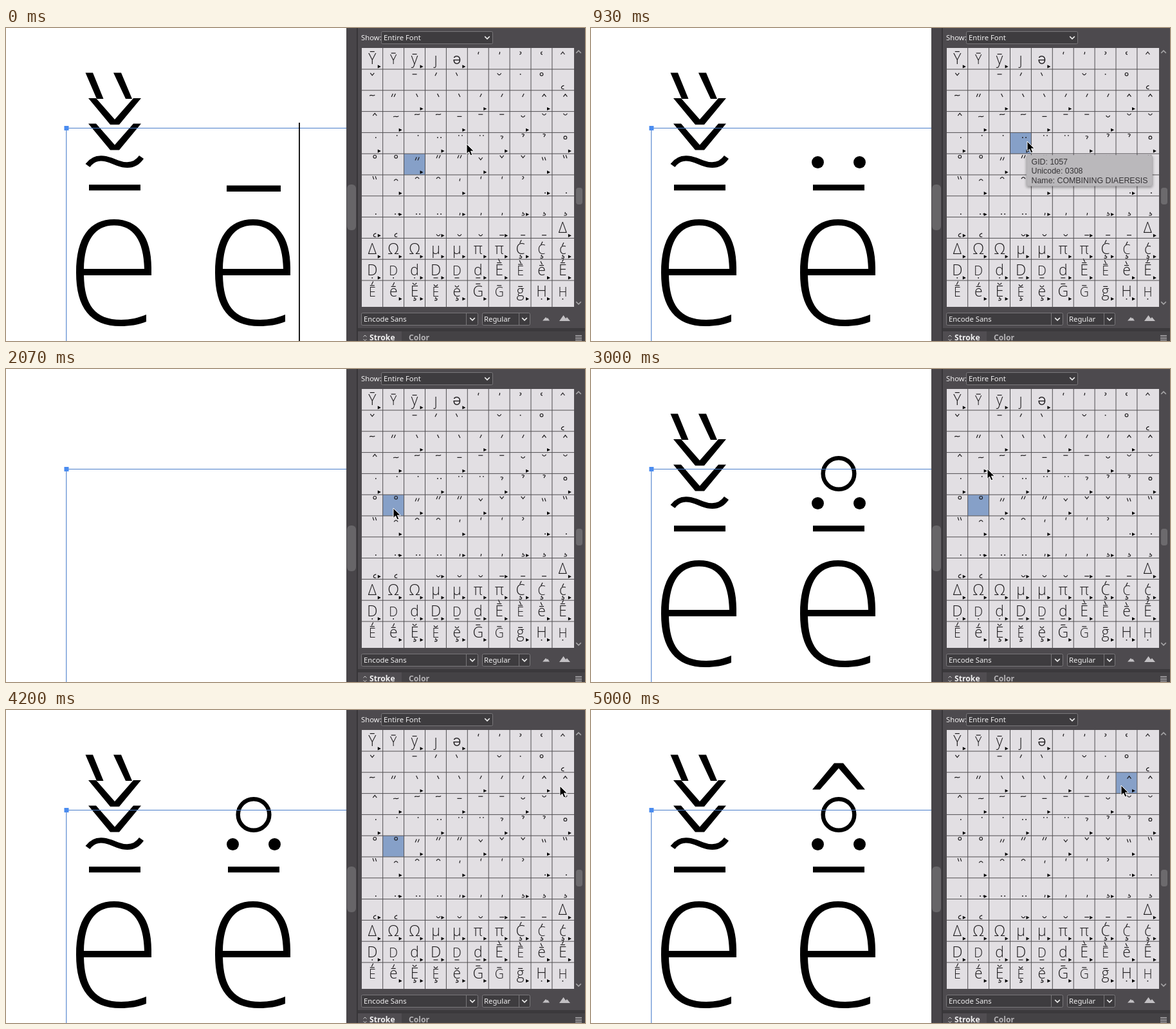
These frames come from a looping animation (900 by 486 pixels, 5070 ms). An HTML page:

```html
<!DOCTYPE html>
<html lang="en">
<head>
<meta charset="utf-8">
<title>Stacking diacritics</title>
<style>
  html, body { margin: 0; width: 100%; height: 100%; overflow: hidden; background: #fff; }
  svg { display: block; width: 900px; height: 486px; }
  .ui { font: 11.3px "Noto Sans", "Open Sans", sans-serif; fill: #f1f0f1; }
  .tab { font-size: 12.2px; font-weight: 700; }
  .glyph { font-family: "Open Sans", Inter, Roboto, "Noto Sans", sans-serif; font-weight: 300; text-anchor: middle; fill: #1c1a1c; }
  .tip text { font: 12.4px "Liberation Sans", Arial, sans-serif; fill: #363437; }
  .field { fill: #3e3c3f; stroke: #79777a; }
  .chev { fill: none; stroke: #eee; stroke-width: 1.5; }
  .mark { fill: none; stroke: #1c1a1c; stroke-width: 1.2; }
  .dot { stroke-width: 1.7; }
</style>
</head>
<body>
<svg viewBox="0 0 900 486">
  <defs>
    <path id="e" fill-rule="evenodd" d="M226 384H121C122 430 138 453 179 453C193 453 206 450 218 445V456C205 461 192 463 178 463C131 463 109 434 109 380C109 325 130 297 168 297C206 297 226 325 226 372ZM121 374H215C214 330 198 306.5 168 306.5C138 306.5 122 330 121 374Z"/>
    <path id="caron" d="M128 109H140L169 142L198 109H210L176 150H162Z"/>
    <path id="bar" d="M129 243.2H209V252.2H129Z"/>
    <path id="chev" class="chev" d="M-3.8-1.9L0 1.9L3.8-1.9"/>
    <filter id="shade" x="-10%" y="-20%" width="120%" height="150%">
      <feDropShadow dx="0" dy="2" stdDeviation="2" flood-opacity=".4"/>
    </filter>
  </defs>

  <rect width="900" height="486" fill="#fff"/>
  <g id="words">
    <use href="#e"/>
    <use href="#bar"/>
    <path d="M127 213.5C136 201 148 200 163 205.5L173 209.5C189 215.5 202 213 210.5 200.5" fill="none" stroke="#000" stroke-width="8.5"/>
    <use href="#caron"/>
    <use href="#caron" y="39.5"/>
    <path d="M123.500 69.500H135L151.500 110H141ZM167 69.500H179L196 110H186Z"/>
    <use href="#e" x="216"/>
    <path id="wideBar" d="M343 244.5H427V254H343Z"/>
    <g id="diaeresis">
      <use href="#bar" x="216"/>
      <circle cx="352.5" cy="208.5" r="9.5"/>
      <circle cx="417.5" cy="208.5" r="9.5"/>
    </g>
    <circle id="ring" cx="385" cy="162.5" r="24.3" fill="none" stroke="#000" stroke-width="6.5"/>
    <path id="hat" d="M344 123.5L378 82.5H392L426 123.5H414L385 90.5L356 123.5Z"/>
  </g>
  <path d="M93.800 486V155.500H529" fill="none" stroke="#4a7ecb" stroke-width="1.1"/>
  <rect x="90.5" y="152" width="7" height="7" fill="#4a8cf0"/>
  <path id="caret" d="M456 147V486" stroke="#000" stroke-width="1.8"/>

  <rect x="529" width="371" height="486" fill="#4d4a4e"/>
  <rect x="529" width="16" height="486" fill="#484549"/>
  <rect x="545" width="2" height="486" fill="#373538"/>
  <rect x="530" y="243" width="14" height="71" rx="6" fill="#676568"/>
  <rect x="553" y="31" width="330" height="402" fill="#e2dfe3"/>
  <rect id="pick" width="32.5" height="32.5" fill="#86a0c8"/>
  <g id="grid"></g>
  <rect x="886" y="248" width="10" height="26" rx="4" fill="#6c6a6d"/>
  <use href="#chev" transform="translate(890 37) scale(1 -1)" opacity=".55"/>
  <use href="#chev" x="890" y="427" opacity=".55"/>

  <g class="ui">
    <text x="552" y="19.3">Show:</text>
    <rect class="field" x="583.5" y="5.5" width="173" height="19" rx="2"/>
    <text x="587" y="19.3">Entire Font</text>
    <use href="#chev" x="748" y="15"/>
    <rect class="field" x="552.5" y="442.5" width="181" height="19" rx="2"/>
    <path d="M715.5 443V461" stroke="#79777a"/>
    <text x="556" y="456.3">Encode Sans</text>
    <use href="#chev" x="725" y="452"/>
    <rect class="field" x="740.5" y="442.5" width="74" height="19" rx="2"/>
    <path d="M797.5 443V461" stroke="#79777a"/>
    <text x="743" y="456.3">Regular</text>
    <use href="#chev" x="806" y="452"/>
    <path d="M834 454.5L839 449L841 451L842 450L845 454.5ZM860 455L866.5 446L870 451L872 449L877 455Z" fill="#c2c0c3"/>
    <rect x="547" y="466" width="353" height="20" fill="#3b393c"/>
    <rect x="547" y="471" width="353" height="15" fill="#444245"/>
    <rect x="547" y="471" width="68" height="15" fill="#504d51"/>
    <path d="M555.5 479.5L558 477L560.5 479.5M555.5 483L558 485.5L560.5 483" fill="none" stroke="#ccc"/>
    <text class="tab" x="565" y="485.3">Stroke</text>
    <text class="tab" x="626" y="485.3" fill="#b5b3b6">Color</text>
    <path d="M885 477.5H895M885 480H895M885 482.5H895M885 485H895" stroke="#c2c0c3"/>
  </g>

  <g id="tips"></g>
  <path id="mouse" d="M0 0V15.5L3.6 12.2L6 18L8.8 16.8L6.4 11.2H11.3Z" fill="#000" stroke="#fff"/>
</svg>
<script>
const NS = 'http://www.w3.org/2000/svg';
const $ = id => document.getElementById(id);
function add(parent, tag, attrs, text) {
  const el = document.createElementNS(NS, tag);
  for (const k in attrs) el.setAttribute(k, attrs[k]);
  if (text) el.textContent = text;
  return parent.appendChild(el);
}

// Small accent shapes, centred on the origin.
const MARKS = {
  c: 'M-3-2L0 1.8L3-2', h: 'M-3 2L0-1.8L3 2', m: 'M-3.5 0H3.5',
  a: 'M-1 2.5L1.5-2.5', g: 'M-1.5-2.5L1 2.5',
  A: 'M-3 2.5L-.8-2.5M1 2.5L3.2-2.5', G: 'M-3.2-2.5L-1.5 2.5M.8-2.5L2.5 2.5',
  b: 'M-3-1.5Q0 3.5 3-1.5', n: 'M-3 1.5Q0-3.5 3 1.5',
  t: 'M-4 .8C-2-2 1.5 2.2 4-.8', r: 'M-2.3 0A2.3 2.3 0 1 1 2.3 0A2.3 2.3 0 1 1-2.3 0',
  d: 'M-.8 0H.8', D: 'M-3.4 0H-1.8M1.8 0H3.4',
  q: 'M-2-2.3Q2.5-3 1.5-.5L0 1V2.2', o: 'M.8-2V0L0 2', z: 'M1.2-2L.3 0V2',
  k: 'M-1.2-2Q1.5-2 1 0Q.5 2-1.5 2', y: 'M1.5-2Q-1-2-1 0Q-1 2 1.5 2',
  s: 'M0-3L-.5-1Q2.5-1 2 1Q1.5 2.5-2 2', O: 'M2-2.8Q-2-2-2 .5Q-2 2.8 2 2.5'
};
Object.assign(MARKS, { x: MARKS.d, X: MARKS.D, v: MARKS.o, B: MARKS.b, M: MARKS.m });
const LOW = 'xXvBMsO', DOTS = 'dDxX';

// "=" letter or "-" small capital, then its accents; ">" has alternates, "_" empty.
const ROWS = [
  '=Ym> -Ym =ym> =ȷ =ə> z o k y h',
  'c _ m a g _ b d r O',
  't A g> g g a> a a h> h',
  'h t> t t m> m m b> b b',
  'd> d d D> D D q> q q r>',
  'r r A> A A c> c c G> G',
  'G n> n n z> z z k x> x',
  'x X> X X v> v v s> s s',
  'O> O _ B> B B M> M M =Δ>',
  '=Δ> =Ω> =Ω> =μ> =μ> =π> =π> =Cas> -Cas =cas>',
  '=Dx> -Dx =dx> =DM> -DM =dM> =Emg> -Emg =emg> =Ema>',
  '-Ema =ema> =Ebs> -Ebs =ebs> =Gm> -Gm =gm> =Hx> -Hx'
];
const CELL_W = 32.9, CELL_H = 32.8, LEFT = 553, TOP = 31;
const colX = c => LEFT + c * CELL_W, rowY = r => TOP + r * CELL_H;

function drawMark(kind, x, y) {
  add($('grid'), 'path', { class: DOTS.includes(kind) ? 'mark dot' : 'mark', d: MARKS[kind], transform: `translate(${x} ${y})` });
}
function drawLetter([type, base, ...accents], x, y) {
  const size = type === '=' ? 23 : 19.5;
  add($('grid'), 'text', { class: 'glyph', x, y, 'font-size': size }, base);
  let top = y - size * (base === base.toUpperCase() ? .714 : .54) - 3;
  for (const kind of accents) {
    const low = LOW.includes(kind);
    drawMark(kind, x, low ? y + 4 : top);
    if (!low) top -= 3.8;
  }
}
function drawCell(token, r, c) {
  const x = colX(c) + 16.3, y = rowY(r), more = token.endsWith('>');
  const name = token.replace('>', ''), kind = name[0];
  if (name.length > 1) {
    drawLetter(name, x, y + 25);
  } else if (MARKS[kind]) {
    const dx = r < 2 || (r === 2 && c < 2) ? 0 : DOTS.includes(kind) ? 5.5 : 4;
    const dy = LOW.includes(kind) ? 28.3 : r < 3 || more ? 8 : 4.8;
    drawMark(kind, x + dx, y + dy);
  }
  if (more) add($('grid'), 'path', { d: `M${x + 8.5} ${y + 26.3}l5 2.6l-5 2.6z`, fill: '#000' });
}
ROWS.forEach((row, r) => row.split(' ').forEach((token, c) => drawCell(token, r, c)));
let lines = '';
for (let c = 1; c < 10; c++) lines += `M${colX(c) - .2} ${TOP}V433`;
for (let r = 1; r < 12; r++) lines += `M${LEFT} ${rowY(r) + .2}H883`;
add($('grid'), 'path', { d: lines, stroke: '#504e51', fill: 'none' });

function makeTip(x, y, w, rows) {
  const g = add($('tips'), 'g', { class: 'tip' });
  add(g, 'rect', { x, y, width: w, height: rows.length * 14.4 + 4.5, rx: 2, fill: '#bab8bb', stroke: '#a5a3a6', 'stroke-width': .6, filter: 'url(#shade)' });
  rows.forEach((s, i) => add(g, 'text', { x: x + 7.5, y: y + 14.4 + i * 14.3 }, s));
  return g;
}
const tipA = makeTip(677, 197.5, 195.5, ['GID: 1057', 'Unicode: 0308', 'Name: COMBINING DIAERESIS']);
const tipB = makeTip(617, 237.5, 210.5, ['GID: 1157', 'Unicode: 030A', 'Small Capitals From Capitals (c2sc)', 'Name: COMBINING RING ABOVE']);

const LOOP = 5070, FPS = 15;
// time, x, y of the pointer
const PATH = [
  [0, 716, 180], [330, 678, 176], [1060, 678, 176], [1470, 617, 217], [1670, 617, 217], [1800, 602, 216],
  [2500, 602, 216], [3000, 616, 155], [3130, 619, 149], [3600, 646, 142], [4100, 861, 118],
  [4200, 861, 118], [4440, 824, 117]
];
// time, column, row of the selected cell
const PICKS = [[0, 2, 5], [600, 3, 4], [2066, 1, 5], [4466, 8, 2]];
const BLANK = 130;
const BLINKS = [[0, 265], [1060, 1530], [2460, 2930], [3460, 3930], [4400, 4460]];

const within = (t, a, b) => t >= a && t < b;
const show = (el, on) => { el.style.visibility = on ? 'inherit' : 'hidden'; };

function pointer(t) {
  const i = PATH.findIndex(p => p[0] > t);
  if (i < 0) return PATH[PATH.length - 1].slice(1);
  const [t0, x0, y0] = PATH[i - 1], [t1, x1, y1] = PATH[i];
  const u = (t - t0) / (t1 - t0), k = u * u * (3 - 2 * u);
  return [x0 + (x1 - x0) * k, y0 + (y1 - y0) * k];
}

function render(now) {
  const t = Math.floor((now % LOOP) * FPS / 1000 + .1) * 1000 / FPS + .5;
  const stage = PICKS.filter(p => p[0] <= t).length - 1;
  const [since, col, row] = PICKS[stage];
  $('pick').setAttribute('x', colX(col));
  $('pick').setAttribute('y', rowY(row) + .3);
  $('words').style.visibility = stage && t < since + BLANK ? 'hidden' : 'visible';
  show($('wideBar'), stage === 0);
  show($('diaeresis'), stage > 0);
  show($('ring'), stage > 1);
  show($('hat'), stage > 2);
  show($('caret'), BLINKS.some(b => within(t, ...b)));
  show(tipA, within(t, 800, 1530));
  show(tipB, within(t, 1660, 2060));
  $('mouse').setAttribute('transform', `translate(${pointer(t).map(v => v.toFixed(1)).join(' ')})`);
}
const start = performance.now();
(function tick() {
  render(performance.now() - start);
  requestAnimationFrame(tick);
})();
</script>
</body>
</html>
```
